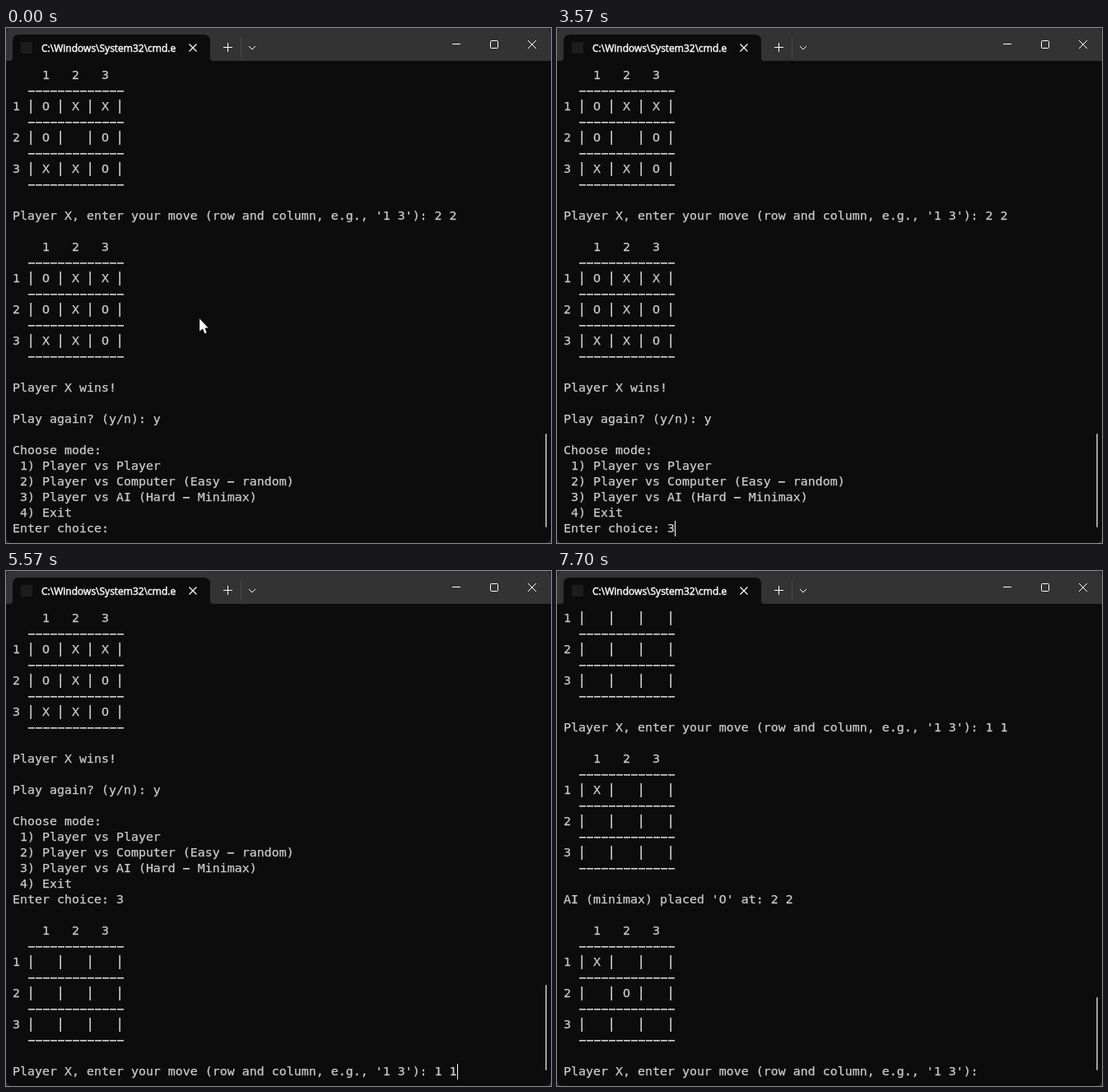
Recreate the animation shown at these times as an HTML page. Size 662 by 626 pixels, loop 8000 ms.

```html
<!DOCTYPE html>
<html lang="en">
<head>
<meta charset="utf-8">
<title>Tic-tac-toe in a terminal</title>
<style>
  html, body { margin: 0; width: 100%; height: 100%; overflow: hidden; background: #262626; }
  #stage { position: relative; width: 662px; height: 626px; overflow: hidden; background: #0c0c0c; border-radius: 7px; }
  #stage > * { position: absolute; }
  #chrome { left: 0; top: 0; }
  #title {
    left: 43px; top: 15px; width: 165px; height: 20px; overflow: hidden; white-space: nowrap;
    font: 12px/20px "Open Sans", "Noto Sans", sans-serif; color: #fff; -webkit-text-stroke: .45px #fff;
  }
  #screen {
    left: 8px; top: 48px; margin: 0; color: #ccc; -webkit-text-stroke: .25px #ccc;
    font: 14.95px/19px "DejaVu Sans Mono", "Noto Sans Mono", monospace;
    font-variant-ligatures: none;
  }
  #screen i, #screen b {
    display: inline-block; width: 9px; height: 19px; vertical-align: top; position: relative;
    font: inherit; color: transparent; -webkit-text-stroke: 0;
  }
  #screen i::before, #screen b::before { content: ""; position: absolute; background: #ccc; }
  #screen i::before { left: .5px; top: 9px; width: 8px; height: 1px; box-shadow: 0 1px #ccca; }
  #screen b::before { left: 4px; top: 1px; width: 1px; height: 17px; box-shadow: -1px 0 #ccc9; }
  #caret { top: 599px; width: 1px; height: 19px; background: #fff; }
  #thumb { left: 655px; bottom: 19px; width: 2px; border-radius: 1px; background: #9f9f9f; }
  #pointer { left: 0; top: 0; overflow: visible; }
</style>
</head>
<body>
<div id="stage">
  <svg id="chrome" width="662" height="40" fill="none" stroke="#fff">
    <rect width="662" height="40" fill="#333" stroke="none"/>
    <path d="M4 40Q8 40 8 36V16Q8 8 16 8H240Q248 8 248 16V36Q248 40 252 40Z" fill="#0c0c0c" stroke="none"/>
    <rect x="18" y="17" width="14" height="14" fill="#1c1c1c" stroke="none"/>
    <path d="M222.5 19.5l9 9m0-9l-9 9" stroke-width="1.2"/>
    <path d="M264 23.5h11M269.5 18v11"/>
    <path d="M285.5 12v24" stroke="#4a4a4a"/>
    <path d="M295 22l4 4l4-4"/>
    <path d="M542 19.5h10"/>
    <rect x="588.5" y="15.5" width="9" height="9" rx="1"/>
    <path d="M634 15l10 10m0-10l-10 10"/>
  </svg>
  <div id="title">C:\Windows\System32\cmd.e</div>
  <pre id="screen"></pre>
  <div id="caret"></div>
  <div id="thumb"></div>
  <svg id="pointer" width="12" height="20">
    <path d="M0 0V16L3.8 12.8L6.3 18.5L9 17.4L6.7 11.8H11Z" fill="#fff" stroke="#000" stroke-width=".4"/>
  </svg>
</div>
<script>
const LOOP = 8000, ROWS = 30, COL = 9;
const FOCUS = 1370, BLINK = 540;
const $ = id => document.getElementById(id);

// Cells are nine characters, row by row.
function board(cells) {
  const rule = "  " + "-".repeat(13);
  const out = ["    1   2   3", rule];
  for (let r = 0; r < 3; r++) {
    out.push(`${r + 1} | ${[...cells.slice(r * 3, r * 3 + 3)].join(" | ")} |`, rule);
  }
  return out;
}

const ask = "Player X, enter your move (row and column, e.g., '1 3'): ";
const choose = "Enter choice: ";
const lines = [
  ...board("OXXO OXXO"), "",
  ask + "2 2", "",
  ...board("OXXOXOXXO"), "",
  "Player X wins!", "",
  "Play again? (y/n): y", "",
  "Choose mode:",
  " 1) Player vs Player",
  " 2) Player vs Computer (Easy - random)",
  " 3) Player vs AI (Hard - Minimax)",
  " 4) Exit",
  choose + "3", "",
  ...board("         "), "",
  ask + "1 1", "",
  ...board("X        "), "",
  "AI (minimax) placed 'O' at: 2 2", "",
  ...board("X   O    "), "",
  ask
];

// Each keystroke or printout: time, line number, text of that line so far
const steps = [
  [0, 29, choose],
  [2840, 29, choose + "3"],
  [3570, 29, choose + "3"],
  [3640, 40, ask],
  [5300, 40, ask + "1"],
  [5500, 40, ask + "1 "],
  [5570, 40, ask + "1 1"],
  [5970, 57, "2 |   | O "],
  [6040, 62, ask]
];

function print([, line, text]) {
  const shown = [...lines.slice(line - ROWS + 1, line), text];
  $("screen").innerHTML = shown.join("\n").replace(/-/g, "<i>-</i>").replace(/\|/g, "<b>|</b>");
  $("caret").style.left = 8 + text.length * COL + "px";
  // The thumb shrinks as the scrollback grows.
  $("thumb").style.height = Math.round(13500 / (89.5 + line)) + "px";
}

// The pointer glides in ten hard steps, overshooting downwards.
function pointerAt(t) {
  const u = Math.min(1, Math.max(0, Math.floor((t - 500) / 66.6) + 1) / 10);
  const ease = u * u * (3 - 2 * u);
  const drop = ease + 0.13 * Math.sin(Math.PI * u);
  return [235 - 87 * ease, 353 + 250 * drop].map(Math.round);
}

let current;
const start = performance.now();
function tick() {
  const t = (performance.now() - start) % LOOP;
  const step = steps.findLast(s => s[0] <= t);
  if (step !== current) print(current = step);

  const since = t - Math.max(step[0], FOCUS);
  const lit = since >= 0 && Math.floor(since / BLINK) % 2 === 0;
  $("caret").style.visibility = lit ? "visible" : "hidden";

  const [x, y] = pointerAt(t);
  $("pointer").style.transform = `translate(${x}px, ${y}px)`;
  $("pointer").style.visibility = t < steps[1][0] ? "visible" : "hidden";
  requestAnimationFrame(tick);
}
tick();
</script>
</body>
</html>
```
